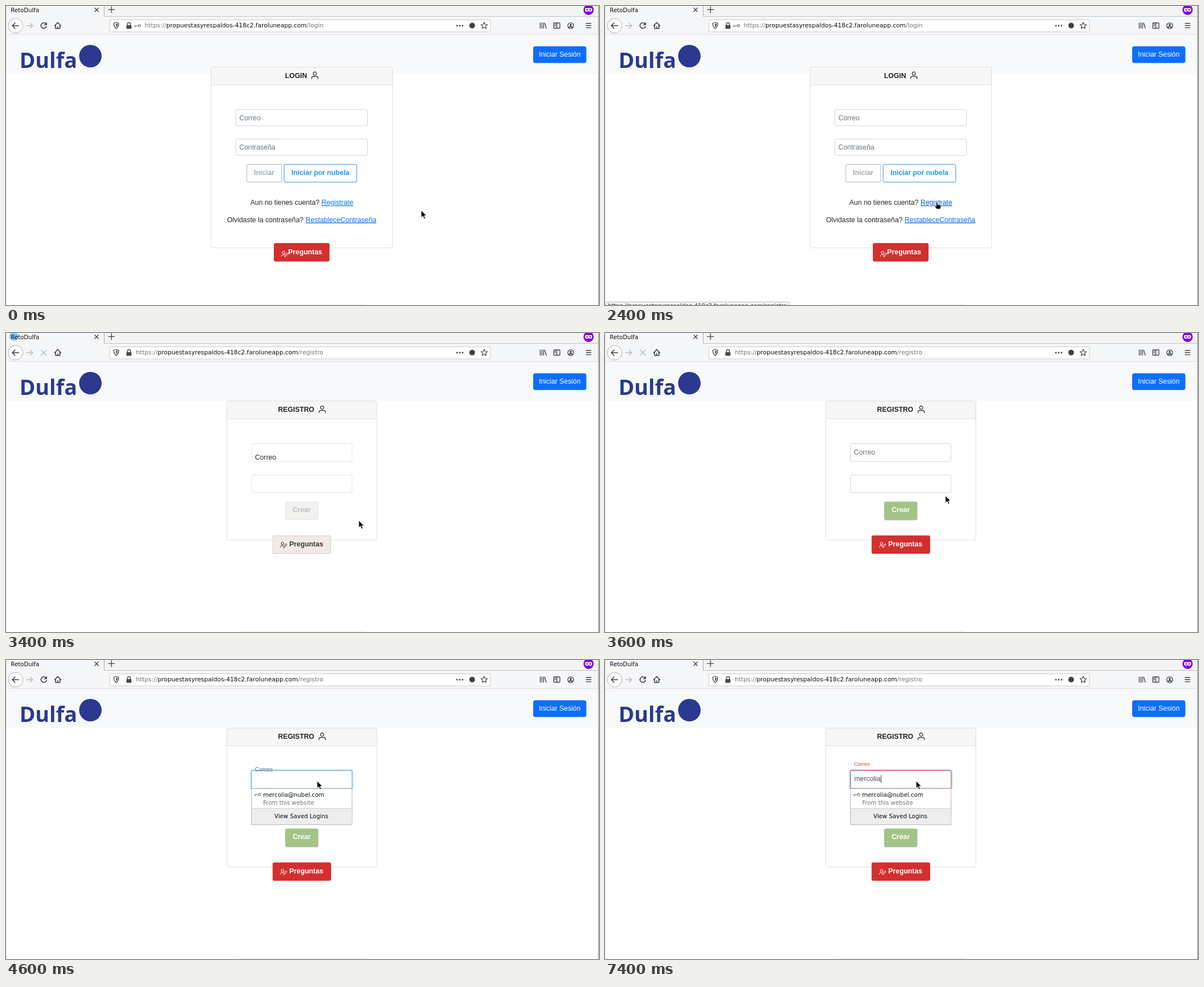
Recreate the animation shown at these times as an HTML page. Size 1054 px wide and 531 px high, loop 8000 ms.

```html
<!DOCTYPE html>
<html lang="es">
<head>
<meta charset="utf-8">
<style>
html, body { margin: 0; width: 100%; height: 100%; overflow: hidden; background: #fff; }
svg { display: block; width: 1054px; height: 531px; }
text { font: 12.35px "Liberation Sans", Arial, sans-serif; white-space: pre; }
.b { font-weight: bold; }
.ui { font: 10.29px "DejaVu Sans", sans-serif; }
.url { font: 10.75px "DejaVu Sans", sans-serif; }
.host { fill: #0c0c0d; }
.brand { font: 600 38px "Noto Sans", sans-serif; }
.link { text-decoration: underline; }
.mid { text-anchor: middle; }
</style>
</head>
<body>
<svg id="stage" viewBox="0 0 1054 531"></svg>
<script>
const LOOP = 8000, STEP = 100;
const INK = '#212529', GREY = '#6c757d', ICON = '#3f3f44', BLUE = '#0d6efd', RED = '#d32f2f', GREEN = '#a3c387';
const HOST = 'propuestasyrespaldos-418c2.faroluneapp.com';
const USER = 'mercolia';
const KEY_TIMES = [5200, 5400, 5600, 5700, 5900, 6200, 6300, 7400];

// time, x, y, cursor shape
const MOUSE = [
  [0, 738, 363, 'arrow'], [500, 738, 363, 'arrow'], [600, 708, 366, 'arrow'], [700, 634, 369, 'arrow'],
  [800, 596, 368, 'arrow'], [1000, 596, 368, 'arrow'], [1100, 595, 376, 'hand'], [1200, 593, 389, 'arrow'],
  [1300, 592, 399, 'arrow'], [1400, 592, 399, 'arrow'], [1500, 592, 390, 'arrow'], [1600, 591, 366, 'arrow'],
  [1700, 590, 357, 'arrow'], [1800, 590, 352, 'hand'], [2000, 590, 349, 'hand'], [2300, 590, 349, 'hand'],
  [2400, 590, 348, 'hand'], [2900, 590, 348, 'hand'], [3000, 599, 345, 'hand'], [3100, 618, 337, 'arrow'],
  [3200, 627, 333, 'arrow'], [3400, 627, 333, 'arrow'], [3500, 621, 318, 'arrow'], [3700, 589, 260, 'arrow'],
  [3800, 570, 235, 'arrow'], [3900, 559, 222, 'beam'], [4200, 553, 218, 'beam'], [4300, 553, 216, 'beam'],
  [4500, 553, 215, 'arrow'], [LOOP, 553, 215, 'arrow']
];

const CURSORS = {
  arrow: '<path d="M0 0V12.6L3 9.9 5.2 14.8 7.3 13.9 5.2 9.2H9.2Z" fill="#000" stroke="#fff" stroke-width=".8"/>',
  hand: '<path d="M-1.2.5Q0-.8 1.2.5V4.6L6 5.8Q7.4 6.3 7.1 8L6 12.6H-.6L-4.2 7.6Q-3.6 6-1.2 7.8Z" fill="#000" stroke="#fff" stroke-width=".8"/>',
  beam: '<path d="M-3-6Q0-6 0-4.5Q0-6 3-6M0-5V6M-3 6.5Q0 6.5 0 5Q0 6.5 3 6.5" fill="none" stroke="#222"/>'
};

const clamp = v => Math.max(0, Math.min(1, v));
const lerp = (a, b, k) => a + (b - a) * k;
const mix = (a, b, k) => `color-mix(in srgb, ${b} ${k * 100}%, ${a})`;
const rect = (x, y, w, h, fill, stroke = 'none', r = 0, sw = 1) =>
  `<rect x="${x}" y="${y}" width="${w}" height="${h}" rx="${r}" style="fill:${fill};stroke:${stroke};stroke-width:${sw}"/>`;
const text = (x, y, s, fill = INK, cls = '', size = '') =>
  `<text x="${x}" y="${y}" class="${cls}" style="fill:${fill};${size && `font-size:${size}px`}">${s}</text>`;
const line = (d, color = ICON, w = 1.3, fill = 'none') =>
  `<path d="${d}" style="fill:${fill};stroke:${color};stroke-width:${w};stroke-linecap:round;stroke-linejoin:round"/>`;
const circle = (x, y, r, fill, stroke = 'none', w = 1.3) =>
  `<circle cx="${x}" cy="${y}" r="${r}" style="fill:${fill};stroke:${stroke};stroke-width:${w}"/>`;
const at = (x, y, s) => `<g transform="translate(${x} ${y})">${s}</g>`;

const person = (x, y) => at(x, y, circle(0, -3, 2.9, 'none', INK, 1.2) + line('M-5.6 6V4.2Q-5.6 2 -3 2H3Q5.6 2 5.6 4.2V6', INK, 1.2));
const editor = (x, y, c) => at(x, y, circle(-2, -2, 2.4, 'none', c, 1) +
  line('M-5.8 4.6V3.7Q-5.4 1.7-3 1.7H-1M-.2 4.8L.4 2.4 4.4-1.8 5.8-.5 2 4.2Z', c, 1));
const keyIcon = (x, y) => at(x, y, circle(3.3, 0, 2.1, 'none', '#77777c', 1.2) + line('M1 0H-5.5V1.8M-3.3 0V1.6', '#77777c', 1.2));

const star = Array.from({ length: 10 }, (_, i) => {
  const a = i * Math.PI / 5, r = i % 2 ? 2.8 : 6;
  return `${850 + r * Math.sin(a)} ${35 - r * Math.cos(a)}`;
}).join('L');

const measure = document.createElement('canvas').getContext('2d');
measure.font = '12.35px "Liberation Sans", Arial, sans-serif';

const FRAME =
  rect(0, 0, 1054, 51, '#f5f6f7') + rect(174, 0, 880, 18, '#f3f3f3') +
  rect(174, 0, 1, 19, '#a9a9ac') + rect(174, 18, 880, 1, '#c2c2c4') + rect(0, 50, 1054, 1, '#dedee0') +
  line('M157.8 3.5L164.2 10M164.2 3.5L157.8 10M182 6.3H193M187.5 1V11.8') +
  circle(1035.5, 6.8, 9.1, '#8000d7') +
  line('M1029.6 4.8Q1032.6 3 1035.5 4.6Q1038.4 3 1041.4 4.8Q1042 10 1038.8 10Q1036.9 10 1035.5 8.4Q1034.1 10 1032.2 10Q1029 10 1029.6 4.8Z', '#fff', .5, '#fff') +
  circle(1032.7, 7, 1.4, '#8000d7') + circle(1038.3, 7, 1.4, '#8000d7') +
  circle(17, 35, 13, '#fcfcfc', '#b5b5b8', 1) +
  line('M22.5 35H11.5M16 30.2L11.3 35L16 39.8', ICON, 1.6) +
  line('M37 35H47.5M43 30.5L47.5 35L43 39.5', '#b9b9bc', 1.5) +
  line('M86.5 35L92 29.3L97.5 35M88.2 34.5V40H95.8V34.5M92 40V36.5', ICON, 1.6) +
  rect(184.5, 24.5, 676.5, 21.5, '#fff', '#c9c9cc', 2) +
  line('M196 29L200.4 30.5Q200.6 37 196 40Q191.4 37 191.6 30.5Z') + line('M196 31.5V37.4Q198.2 35.5 198.2 32.2Z', ICON, .5, ICON) +
  rect(214, 34, 9, 6.6, '#4a4a4f', 'none', 1) + line('M215.8 34V32Q216 29.4 218.5 29.4Q221 29.4 221.2 32V34', '#4a4a4f', 1.5) +
  [801.5, 806.5, 811.5].map(x => circle(x, 35, 1.4, ICON)).join('') +
  circle(828.5, 34.8, 5, ICON) + line(`M${star}Z`, ICON, 1.2) +
  line('M949.5 30V39.5M952.5 30V39.5M955.5 30V39.5M957.5 30.3L960.3 39.5') +
  line('M974.5 30H983.5Q984.5 30 984.5 31V38.5Q984.5 39.5 983.5 39.5H974.5Q973.5 39.5 973.5 38.5V31Q973.5 30 974.5 30ZM979 30V39.5M975.5 32.5H977M975.5 35H977') +
  circle(1003.7, 35, 5.2, 'none', ICON) + circle(1003.7, 33.6, 1.9, ICON) + line('M1000.6 38Q1003.7 35.5 1006.8 38', ICON, 1.8) +
  line('M1031.2 31H1039.8M1031.2 34.8H1039.8M1031.2 38.6H1039.8', ICON, 1.4) +
  rect(0, 51, 1054, 480, '#fff') + rect(1, 51, 1051, 70, '#f8f9fa') +
  text(24, 109.5, 'Dulfa', '#2b3990', 'brand') + circle(150, 89, 20, '#2b3990') +
  rect(937.5, 72, 93.5, 28.8, BLUE, BLUE, 3) + text(984.3, 90.3, 'Iniciar Sesión', '#fff', 'mid') +
  rect(414, 529.5, 225, 1.5, '#f1f1f1') + rect(0, 0, 1, 531, '#e3e3e5') + rect(1052.5, 0, 1.5, 531, '#aaaaad');

function card(x, y, w, h, title, titleX, iconX) {
  return rect(x, y, w, h, '#fff', '#dfdfdf', 3) + rect(x, y, w, 31.5, '#f7f7f7', '#dfdfdf', 3) +
    text(titleX, y + 19.3, title, INK, 'b') + person(iconX, y + 14.6);
}

function toolbar(t) {
  const login = t < 3200;
  const loading = t >= 3200 && t < 3600;
  const burst = clamp((t - 3400) / 150);
  const reload = t >= 3200 && t < 4200 ? '#b9b9bc' : ICON;
  let s = '';
  if (loading) s += `<g opacity="${1 - burst * .8}">${circle(14, 6, t < 3400 ? 5 : lerp(8, 13, burst), '#8fc6f2')}</g>`;
  s += text(8.5, 10.5, 'RetoDulfa', '#0c0c0d', 'ui');
  s += t >= 3200 && t < 3700
    ? line('M62.5 30.3L71.7 39.5M71.7 30.3L62.5 39.5', reload, 1.5)
    : line('M71 31.5A5 5 0 1 0 72 36.2', reload, 1.6) + line('M72.4 29.6V33.6H68.4Z', reload, .8, reload);
  if (login) s += keyIcon(234, 35);
  return s + text(login ? 246.5 : 231, 38.3,
    `https://<tspan class="host">${HOST}</tspan>/${login ? 'login' : 'registro'}`, '#737378', 'url');
}

function loginPage(t) {
  const hover = (a, b) => t >= a && t < b ? '#0a58ca' : BLUE;
  let s = card(364.5, 108.5, 322.5, 321, 'LOGIN', 496, 549) +
    rect(408.5, 183.8, 234, 29, '#fff', '#ced4da', 3) + text(414.8, 202.5, 'Correo', GREY) +
    rect(408.5, 236.3, 234, 29, '#fff', '#ced4da', 3) + text(414.8, 255, 'Contraseña', GREY) +
    rect(428, 281.3, 62, 31.5, '#fff', '#aab2bf', 2) + text(459, 299.7, 'Iniciar', '#a3abb7', 'b mid') +
    rect(494.3, 281.3, 129, 31.5, '#fff', '#2196f3', 2) + text(558.8, 299.7, 'Iniciar por nubela', '#2196f3', 'b mid') +
    text(434.3, 353, 'Aun no tienes cuenta?') + text(560.8, 353, 'Registrate', hover(1800, 3100), 'link') +
    text(393, 383.7, 'Olvidaste la contraseña?') + text(532.6, 383.7, 'RestableceContraseña', hover(1100, 1200), 'link') +
    rect(476.6, 421.6, 98, 31.6, RED, RED, 2) + editor(495.5, 440, '#fff') + text(501.5, 441.2, 'Preguntas', '#fff', 'b');
  if (t >= 2200 && t < 3100)
    s += rect(1.5, 525.5, 326, 8, '#f1f1f2', '#c4c4c6', 1) + text(5, 536, `https://${HOST}/registro`, '#333', 'ui');
  return s;
}

function dropdown() {
  return rect(436.5, 228.5, 178.5, 64, '#fff', '#b8b8ba') + rect(437, 263.5, 177.5, 28.5, '#ededed') +
    rect(437, 263, 177.5, 1, '#d0d0d2') + keyIcon(447.5, 239) +
    text(457, 242.5, `${USER}@nubel.com`, '#0c0c0d', 'ui') + text(457, 257, 'From this website', '#737373', 'ui') +
    text(525, 281, 'View Saved Logins', '#0c0c0d', 'ui mid');
}

function registerPage(t) {
  const open = clamp((t - 3400) / 200 + .04);
  const focus = clamp((t - 4400) / 300);
  const invalid = clamp((t - 5100) / 300);
  const idle = mix('#e3e5e7', '#ced4da', open);
  const border = mix(mix(idle, '#2196f3', focus), '#e5484d', invalid);
  const typed = USER.slice(0, KEY_TIMES.filter(k => k <= t).length);
  const ask = mix('#2b2f33', '#ffffff', open);
  let s = card(392.5, 121, 266.5, 246.5, 'REGISTRO', 483.5, 562);
  if (focus) s += rect(435.5, 195.5, 180.5, 33.5, 'none', mix('#ffffff', '#a6d5fa', focus), 3, 3);
  s += rect(436.5, 196.5, 178.5, 31.5, '#fff', border, 2) + rect(436.5, 252, 178.5, 31.5, '#fff', idle, 2) +
    text(442.5, lerp(lerp(225.3, 216.3, open), 188.3, focus), 'Correo',
      mix(mix(INK, GREY, open), '#e53935', invalid), '', lerp(12.35, 9.26, focus)) +
    text(443, 215, typed, '#495057');
  if (t >= 4700 && !(t >= 6800 && t < 7400))
    s += rect(443.6 + measure.measureText(typed).width, 204.5, 1, 13.5, '#333');
  s += rect(496.5, 301, 58.5, 32, `rgba(0,0,0,${.16 * open})`, 'none', 2.5) +
    rect(496.7, 299.9, 58, 31.4, mix('#f4f4f4', GREEN, open), mix('#e4e4e4', GREEN, open), 2) +
    text(525.6, 318.3, 'Crear', mix('#b9bbbd', '#ffffff', open), 'b mid') +
    rect(474.3, 360, 103, 31.6, mix('#f4f0f0', RED, open), mix('#d4d4d4', RED, open), 2) +
    editor(493.5, 376, ask) + text(503.5, 379.3, 'Preguntas', ask, 'b');
  return t >= 4500 ? s + dropdown() : s;
}

function mouse(t) {
  const i = MOUSE.findLastIndex(k => k[0] <= t);
  const [t0, x0, y0, shape] = MOUSE[i], [t1, x1, y1] = MOUSE[i + 1];
  const k = (t - t0) / (t1 - t0);
  return at(lerp(x0, x1, k), lerp(y0, y1, k), CURSORS[shape]);
}

const stage = document.getElementById('stage');
const start = performance.now();
let shown = -1;

function tick() {
  const t = Math.floor((performance.now() - start) % LOOP / STEP) * STEP;
  if (t !== shown) {
    shown = t;
    stage.innerHTML = FRAME + toolbar(t) + (t < 3400 ? loginPage(t) : registerPage(t)) + mouse(t);
  }
  requestAnimationFrame(tick);
}
tick();
</script>
</body>
</html>
```
